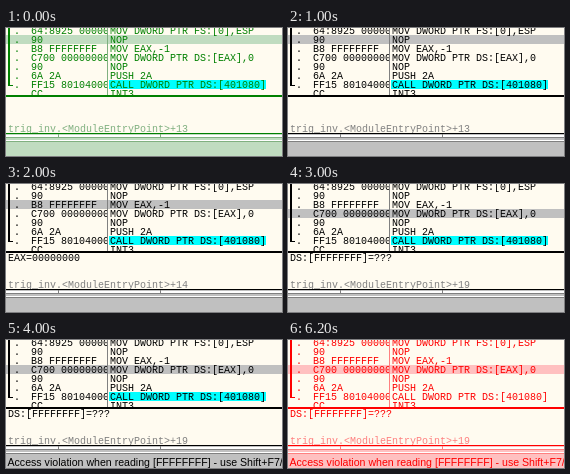
Animation, 276 px wide and 128 px high, one loop 7000 ms. Source, as an HTML page:

```html
<!DOCTYPE html>
<html lang="en">
<head>
<meta charset="utf-8">
<title>Debugger stepping</title>
<style>
html, body { margin: 0; width: 100%; height: 100%; overflow: hidden; }
svg {
  display: block; width: 276px; height: 128px;
  animation: theme 7s step-end infinite;
  background: #fffbf0;
}
text { font: 10px "Liberation Mono", monospace; fill: var(--ink); white-space: pre; }
.ink { fill: var(--ink); }
.face { fill: var(--face); }
.shade { fill: var(--shade); }
.light { fill: #fff; }
.call { fill: var(--call); }
.status { font: 10.6px "Liberation Sans", sans-serif; }

/* Each state colours the whole window: green start, neutral steps, red stop. */
@keyframes theme {
  0% { --ink: #008000; --face: #c0dcc0; --shade: #80b080; --call: #00ffff; }
  14.2857% { --ink: #000; --face: #c0c0c0; --shade: #808080; --call: #00ffff; }
  71.4286%, 100% { --ink: #ff0000; --face: #ffc0c0; --shade: #ff8080; --call: #fffbf0; }
}

.cursor { animation: cursor 7s step-end infinite; }
@keyframes cursor {
  0% { transform: translateY(0); }
  28.5714% { transform: translateY(9px); }
  42.8571%, 100% { transform: translateY(18px); }
}

.first, .second, .third, .status { animation: 7s step-end infinite; }
.first { animation-name: first; }
.second { animation-name: second; }
.third { animation-name: third; }
.status { animation-name: status; }
@keyframes first { 0% { opacity: 1; } 28.5714%, 100% { opacity: 0; } }
@keyframes second { 0% { opacity: 0; } 28.5714% { opacity: 1; } 42.8571%, 100% { opacity: 0; } }
@keyframes third { 0% { opacity: 0; } 42.8571%, 100% { opacity: 1; } }
@keyframes status { 0% { opacity: 0; } 57.1429%, 100% { opacity: 1; } }
</style>
</head>
<body>
<svg viewBox="0 0 276 128" shape-rendering="crispEdges">
  <defs>
    <clipPath id="listing"><rect width="276" height="67"/></clipPath>
    <clipPath id="hex"><rect width="101" height="67"/></clipPath>
  </defs>

  <rect class="face cursor" y="7" width="276" height="9"/>
  <rect class="call" x="103" y="52" width="157" height="9"/>
  <g id="bytes" clip-path="url(#hex)"></g>
  <g id="code" clip-path="url(#listing)"></g>
  <rect class="ink" x="2" width="2" height="58"/>
  <rect class="ink" x="2" y="57" width="5" height="1"/>
  <rect class="shade" x="101" width="1" height="67"/>
  <rect class="ink" y="67" width="276" height="2"/>

  <text class="second" x="2" y="77">EAX=00000000</text>
  <text class="third" x="2" y="77">DS:[FFFFFFFF]=???</text>
  <text class="shade" x="2" y="104">trig_inv.&lt;ModuleEntryPoint&gt;+</text>
  <text class="shade first" x="170" y="104">13</text>
  <text class="shade second" x="170" y="104">14</text>
  <text class="shade third" x="170" y="104">19</text>

  <rect class="face" y="105" width="276" height="23"/>
  <rect class="ink" y="105" width="276" height="1"/>
  <rect class="light" y="107" width="276" height="2"/>
  <rect class="shade" y="109" width="276" height="1"/>
  <rect class="shade" x="52" y="106" width="1" height="4"/>
  <rect class="shade" x="154" y="106" width="1" height="4"/>
  <rect class="light" y="112" width="276" height="1"/>
  <rect class="shade" y="113" width="276" height="1"/>
  <text class="status" x="1.5" y="126">Access violation when reading [FFFFFFFF] - use Shift+F7/</text>
</svg>
<script>
const instructions = [
  ["64:8925 00000000", "MOV DWORD PTR FS:[0],ESP"],
  ["90", "NOP"],
  ["B8 FFFFFFFF", "MOV EAX,-1"],
  ["C700 00000000", "MOV DWORD PTR DS:[EAX],0"],
  ["90", "NOP"],
  ["6A 2A", "PUSH 2A"],
  ["FF15 80104000", "CALL DWORD PTR DS:[401080]"],
  ["CC", "INT3"]
];

function addText(parentId, x, y, content) {
  const label = document.createElementNS("http://www.w3.org/2000/svg", "text");
  label.setAttribute("x", x);
  label.setAttribute("y", y);
  label.textContent = content;
  document.getElementById(parentId).append(label);
}

instructions.forEach(([bytes, code], row) => {
  const baseline = 6 + row * 9;
  if (bytes !== "CC") addText("bytes", 8, baseline, ".");
  addText("bytes", 25, baseline, bytes);
  addText("code", 104, baseline, code);
});
</script>
</body>
</html>
```
